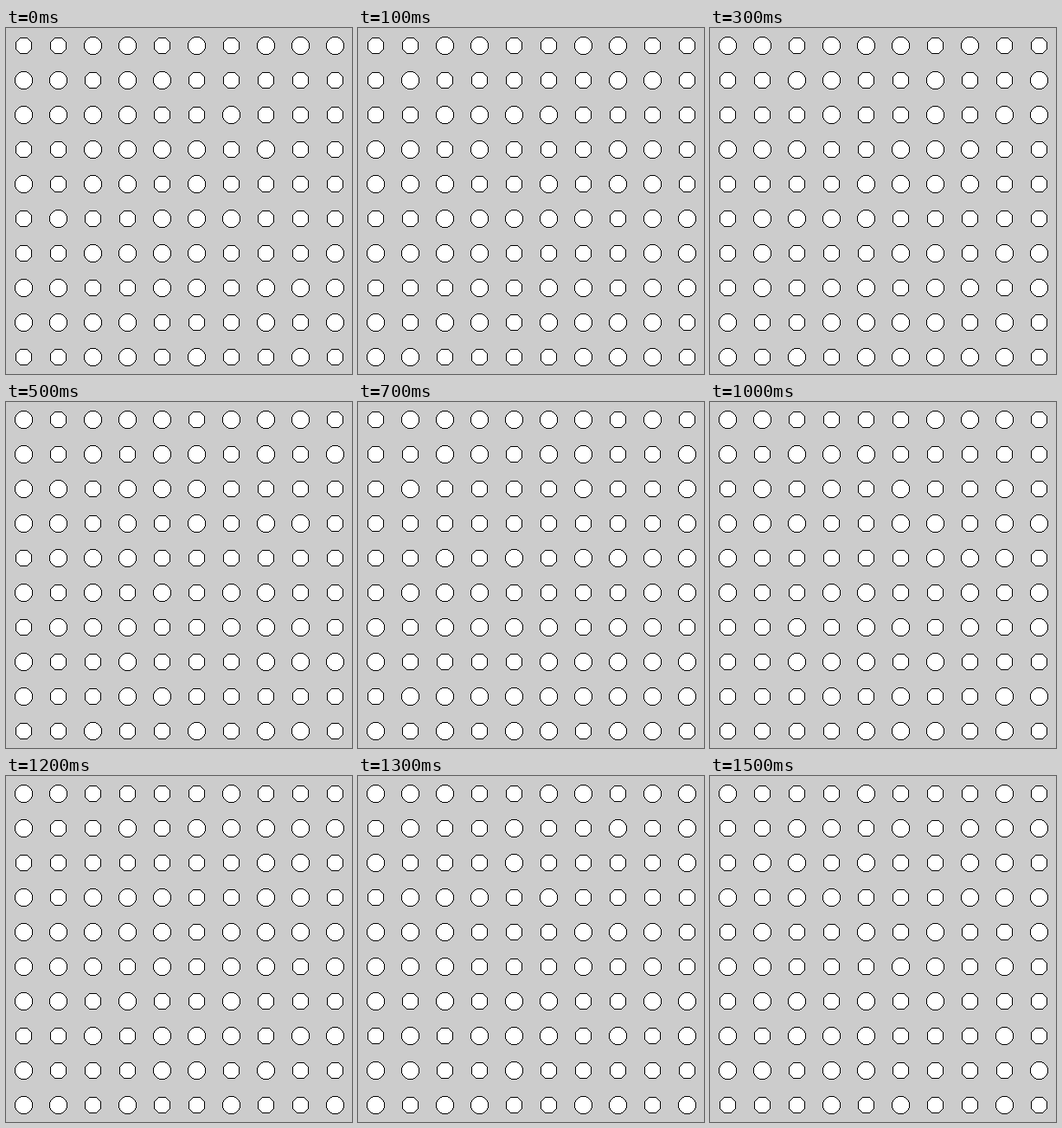
Recreate the animation shown at these times as an HTML page. Size 400 px wide and 400 px high, loop 1.6 s.

```html
<!DOCTYPE html>
<html lang="en">
<head>
<meta charset="utf-8">
<title>Trembling dots</title>
<style>
  html, body { margin: 0; width: 100%; height: 100%; overflow: hidden; background: #ccc; }
  svg { display: block; width: 400px; height: 400px; }
</style>
</head>
<body>
<svg id="stage" viewBox="0 0 400 400" shape-rendering="crispEdges">
  <defs id="defs"></defs>
</svg>
<script>
  const NS = 'http://www.w3.org/2000/svg';
  const STEP = 100, STEPS = 16, COUNT = 10, GAP = 40;
  const RADII = { small: 9.42, large: 10 };
  const HALF_LINE = 0.45;
  const dots = [];

  function add(parent, tag, attrs) {
    const el = document.createElementNS(NS, tag);
    for (const key in attrs) el.setAttribute(key, attrs[key]);
    return parent.appendChild(el);
  }

  // A hard-edged disc: whole pixels sorted into fill and outline by distance
  function defineDot(id, radius) {
    let fill = '', line = '';
    for (let y = -11; y <= 11; y++) {
      for (let x = -11; x <= 11; x++) {
        const edge = Math.hypot(x, y) - radius;
        const pixel = `M${x} ${y}h1v1h-1z`;
        if (Math.abs(edge) < HALF_LINE) line += pixel;
        else if (edge < 0) fill += pixel;
      }
    }
    const group = add(defs, 'g', { id });
    add(group, 'path', { d: fill, fill: '#fff' });
    add(group, 'path', { d: line, fill: '#000' });
  }

  // Seeded random numbers in [0, 1)
  function randomFrom(seed) {
    let s = seed;
    return () => {
      s = (s + 0x6D2B79F5) | 0;
      let t = Math.imul(s ^ (s >>> 15), 1 | s);
      t = (t + Math.imul(t ^ (t >>> 7), 61 | t)) ^ t;
      return ((t ^ (t >>> 14)) >>> 0) / 4294967296;
    };
  }

  const stage = document.getElementById('stage');
  const defs = document.getElementById('defs');
  for (const id in RADII) defineDot(id, RADII[id]);
  for (let row = 0; row < COUNT; row++) {
    for (let col = 0; col < COUNT; col++) {
      dots.push(add(stage, 'use', { x: 20 + col * GAP, y: 20 + row * GAP }));
    }
  }

  let shown = -1;

  // Every step gives each dot a fresh size
  function draw(time) {
    const step = Math.floor(time / STEP) % STEPS;
    if (step === shown) return;
    shown = step;
    const random = randomFrom(1013 * (step + 1));
    for (const dot of dots) dot.setAttribute('href', random() < 0.5 ? '#small' : '#large');
  }

  const start = performance.now();
  function tick() {
    draw(performance.now() - start);
    requestAnimationFrame(tick);
  }
  draw(0);
  requestAnimationFrame(tick);
</script>
</body>
</html>
```
